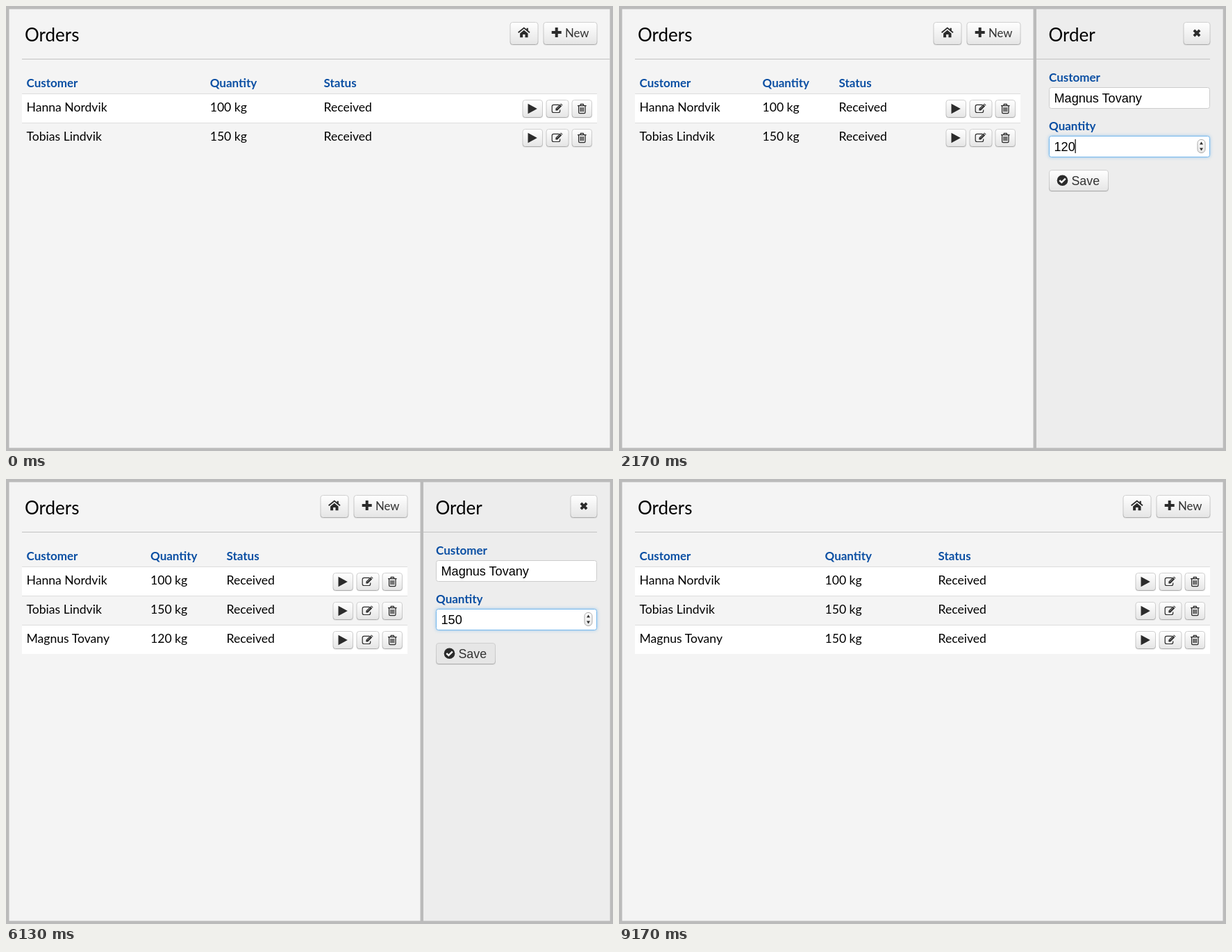
Write an HTML page that moves like this. It is 874 px wide and 641 px high and loops after 9.93 s.

```html
<!DOCTYPE html>
<html lang="en">
<head>
<meta charset="utf-8">
<title>Orders</title>
<style>
  html, body { margin: 0; width: 100%; height: 100%; overflow: hidden; background: #bbb; }
  svg { display: block; }
  text { font: 17.6px Lato, "Open Sans", sans-serif; fill: #000; white-space: pre; }
  .title { font-size: 26px; }
  .label { font-size: 17px; font-weight: 700; fill: #0b4fa3; }
  .field { font: 18.1px "Liberation Sans", Arial, sans-serif; }
  .caption { font-size: 16.8px; fill: #333; }
  .save { font: 17.8px "Liberation Sans", Arial, sans-serif; fill: #333; }
  .icon { fill: #2b2b2b; }
  .line { fill: none; stroke: #2b2b2b; }
</style>
</head>
<body>
<svg width="874" height="641" viewBox="0 0 874 641">
  <defs>
    <linearGradient id="face" x2="0" y2="1">
      <stop stop-color="#fff"/><stop offset="1" stop-color="#e5e5e5"/>
    </linearGradient>
    <linearGradient id="edge" x2="0" y2="1">
      <stop stop-color="#d0d0d0"/><stop offset=".8" stop-color="#c6c6c6"/><stop offset="1" stop-color="#adadad"/>
    </linearGradient>
    <filter id="glow" x="-10%" y="-50%" width="120%" height="200%">
      <feGaussianBlur stdDeviation="2.6"/>
    </filter>

    <!-- icons are centred on the origin -->
    <g id="home">
      <path class="line" stroke-width="1.9" d="M-8.2-.3L0-6.9L8.2-.3"/>
      <path class="icon" d="M-5.7 1L0-3.7L5.7 1V6.7H1.7V2.6H-1.7V6.7H-5.7ZM3.8-6.8H6V-1.5L3.8-3.4Z"/>
    </g>
    <path id="plus" class="line" stroke-width="4" d="M-7 0H7M0-7V7"/>
    <path id="cross" class="line" stroke-width="3.8" d="M-4.1-4.1L4.1 4.1M4.1-4.1L-4.1 4.1"/>
    <path id="play" class="icon" d="M-6.3-7.2L7 0L-6.3 7.2Z"/>
    <g id="edit">
      <path class="line" stroke-width="1.2" d="M2.6-5.3H-5.1Q-7.5-5.3-7.5-3V3.6Q-7.5 5.9-5.1 5.9H1.6Q4 5.9 4 3.6V1.9"/>
      <path class="icon" d="M-2.3 2.8V.2L3.9-6L6.5-3.4L.3 2.8ZM4.5-6.6L5.4-7.2L8-4.6L7.1-4Z"/>
      <path d="M-.6.6L4-4" stroke="#eee" stroke-width=".6"/>
    </g>
    <path id="trash" class="line" stroke-width="1.3"
      d="M-6.3-4.4H6.3M-2.7-4.6L-1.9-6.5H1.9L2.7-4.6M-4.7-4.2V4.9Q-4.7 6.6-3.2 6.6H3.2Q4.7 6.6 4.7 4.9V-4.2M-2.1-1.9V4.2M0-1.9V4.2M2.1-1.9V4.2"/>
    <g id="check">
      <circle class="icon" r="7.8"/>
      <path d="M-4.2-.2L-1.2 2.8L4.3-2.7" fill="none" stroke="#fff" stroke-width="2.5"/>
    </g>
  </defs>
  <g id="stage"></g>
</svg>
<script>
const stage = document.getElementById("stage");
const LOOP = 9930;
const customers = ["Hanna Nordvik", "Tobias Lindvik", "Magnus Tovany"];

// cols: x of the quantity and status columns; entry: quantity typed in the side panel
const scenes = [
  { at: 0, cols: [293.7, 457.5], kg: [100, 150] },
  { at: 2170, cols: [206.5, 316.5], kg: [100, 150], entry: 120, caret: true },
  { at: 4070, cols: [296.5, 459.5], kg: [100, 150, 120] },
  { at: 6130, cols: [208, 317.5], kg: [100, 150, 120], entry: 150, hover: true },
  { at: 8030, cols: [296.5, 459.5], kg: [100, 150, 150] },
];

const rect = (x, y, w, h, fill, more = "") =>
  `<rect x="${x}" y="${y}" width="${w}" height="${h}" fill="${fill}" ${more}/>`;
const text = (x, y, s, cls = "") => `<text x="${x}" y="${y}" class="${cls}">${s}</text>`;
const icon = (id, x, y) => `<use href="#${id}" x="${x}" y="${y}"/>`;

const button = (x, y, w, h, fill = "url(#face)") =>
  rect(x, y + 1, w, h, "#000", 'rx="4" opacity=".06"') +
  rect(x + .5, y + .5, w - 1, h - 1, fill, 'rx="3.5" stroke="url(#edge)"');

const input = (y, value, stroke = "#ccc") =>
  rect(619.5, y + .5, 231, 30, "#fff", `rx="3" stroke="${stroke}"`) +
  text(626.5, y + 21.5, value, "field");

function row(name, kg, i, cols, right) {
  const y = 127 + 42 * i;
  return rect(23, y - 1, right - 23, 1, "#ddd") +
    (i % 2 ? "" : rect(23, y, right - 23, 41, "#fff")) +
    text(29.5, y + 25, name) + text(cols[0], y + 25, kg + " kg") + text(cols[1], y + 25, "Received") +
    button(right - 107.5, y + 8, 29.5, 26) + icon("play", right - 93.2, y + 21) +
    button(right - 73.5, y + 8, 33, 26) + icon("edit", right - 57.3, y + 20.6) +
    button(right - 36.5, y + 8, 29.5, 26) + icon("trash", right - 21.7, y + 21);
}

function orders({ cols, kg, entry }) {
  const right = entry ? 578 : 851;
  return rect(4.5, 4.5, 865, 632, "#f4f4f4") +
    text(27, 51, "Orders", "title") +
    rect(23, 76, (entry ? 597 : 869.5) - 23, 1, "#c2c2c2") +
    button(right - 125.5, 23, 41, 33) + icon("home", right - 105.2, 38.5) +
    button(right - 77.5, 23, 78, 33) + icon("plus", right - 58.3, 38) +
    text(right - 46, 45, "New", "caption") +
    ["Customer", "Quantity", "Status"].map((s, i) => text([29.5, ...cols][i], 116.5, s, "label")).join("") +
    kg.map((n, i) => row(customers[i], n, i, cols, right)).join("");
}

function panel({ entry, caret, hover }) {
  return rect(596.5, 4, 273, 633, "#bbb") + rect(601, 4.5, 268.5, 632, "#ededed") +
    text(618.5, 51, "Order", "title") + rect(601, 76, 250, 1, "#c2c2c2") +
    button(812.5, 23, 39, 33) + icon("cross", 832, 39) +
    text(619, 109, "Customer", "label") + input(117, customers[2]) +
    text(619, 179, "Quantity", "label") +
    rect(619, 187, 232, 31, "#52a8ec", 'rx="4" opacity=".55" filter="url(#glow)"') +
    input(187, entry, "#75b7ec") +
    (caret ? rect(656.5, 192, 1.2, 20, "#000") : "") +
    rect(833, 192.5, 11, 19, "url(#face)", 'rx="5" stroke="#aaa"') +
    '<path class="icon" d="M836 199.5h5l-2.5-4zM836 204.5h5l-2.5 4z"/>' +
    button(619, 236, 86, 31, hover && "#e6e6e6" || undefined) +
    icon("check", 638.5, 251.3) + text(651.5, 258, "Save", "save");
}

let shown;
function frame() {
  const t = performance.now() % LOOP;
  const scene = scenes.findLast(s => s.at <= t);
  if (scene !== shown) {
    shown = scene;
    stage.innerHTML = orders(scene) + (scene.entry ? panel(scene) : "");
  }
  requestAnimationFrame(frame);
}
frame();
</script>
</body>
</html>
```
